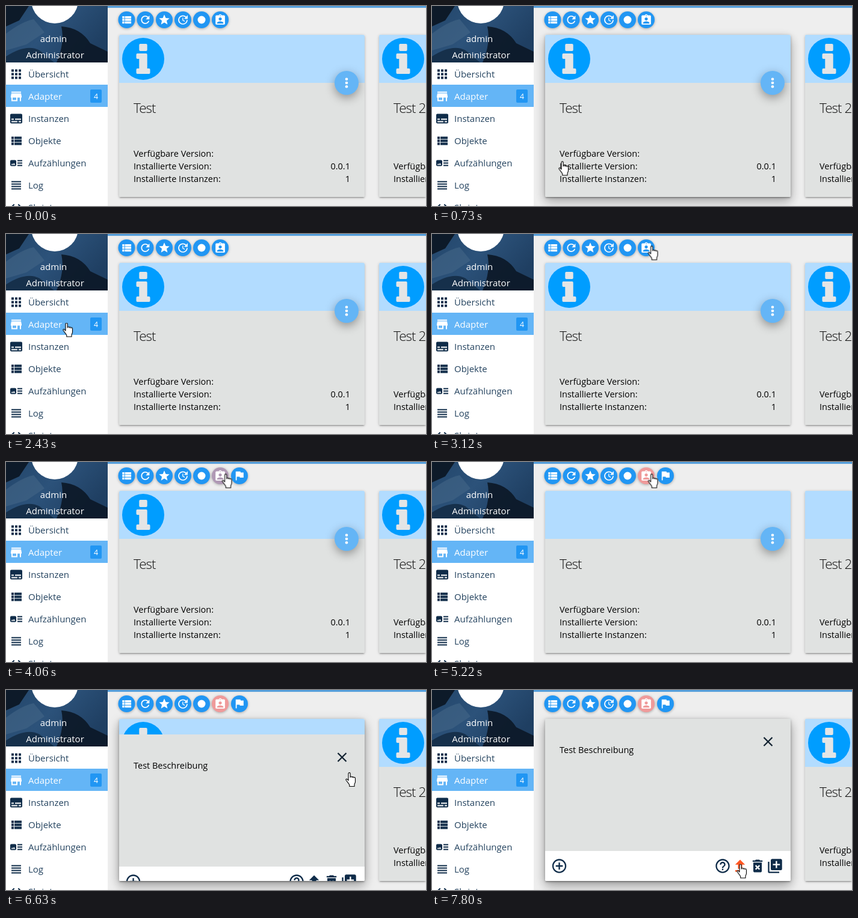
Recreate the animation shown at these times as an HTML page. Size 698 px wide and 333 px high, loop 8 s.

```html
<!DOCTYPE html>
<html lang="de">
<head>
<meta charset="utf-8">
<title>Adapter</title>
<style>
html, body { margin: 0; width: 100%; height: 100%; overflow: hidden; }
main { position: relative; width: 100%; height: 100%; overflow: hidden; contain: paint; background: #eee; }
svg, .card { position: absolute; }
svg { left: 0; top: 0; width: 698px; height: 333px; font-family: "Open Sans", "Noto Sans", sans-serif; font-size: 14.5px; }

.card { top: 48px; left: 188px; width: 408px; height: 270px; border-radius: 2px;
  box-shadow: 0 2px 2px rgba(0,0,0,.14), 0 3px 1px -2px rgba(0,0,0,.12), 0 1px 5px rgba(0,0,0,.2); }
.second { left: 620px; width: 78px; }
.lift { box-shadow: 0 8px 17px rgba(0,0,0,.2), 0 6px 20px rgba(0,0,0,.19); animation: lift 8s linear infinite; }

.nav { font-size: 15px; fill: #24435f; }
.icons { fill: #0f2c49; }
.white { fill: #fff; }
.strong { font-weight: 500; }
.mid { text-anchor: middle; }
.end { text-anchor: end; }
.title { font-size: 22.5px; font-weight: 300; letter-spacing: -1px; fill: #111; }
.round { fill: #2196f3; filter: drop-shadow(0 1px 2px rgba(0,0,0,.3)); }
.fab { fill: #64b5f6; filter: drop-shadow(0 5px 8px rgba(0,0,0,.36)); }
.tip rect { fill: #fff; stroke: #767676; filter: drop-shadow(2px 2px 2px rgba(0,0,0,.3)); }
.tip text { font-size: 11.5px; fill: #575757; }

/* With jump-start, each value below is what shows until its time. */
.hand, .reveal, .tip, .flag, .pic, .row { animation: 8s steps(1, start) infinite; }
.hand { animation-name: hand; }
.reveal { animation-name: reveal; }
.tip { animation-name: tip; }
.flag { animation-name: flag; }
.pic { animation-name: pic; }
.row { animation-name: row; }
.toggle { animation: toggle 8s linear infinite; }
.upload { animation: upload 8s linear infinite; }

@keyframes hand {
  0% { transform: translate(330px, 345px); }
  5.5% { transform: translate(330px, 345px); animation-timing-function: steps(6, start); }
  11.125% { transform: translate(150px, 215px); animation-timing-function: steps(4, start); }
  14.875% { transform: translate(102px, 166.5px); }
  15.875% { transform: translate(100.5px, 161px); }
  16.875% { transform: translate(96px, 154px); }
  18.75% { transform: translate(92px, 148px); }
  20.625% { transform: translate(85.5px, 135px); }
  30.375% { transform: translate(90.5px, 135px); }
  31.375% { transform: translate(94px, 147.5px); animation-timing-function: steps(4, start); }
  35.25% { transform: translate(230px, 85px); animation-timing-function: steps(4, start); }
  39% { transform: translate(352px, 25px); }
  71.125% { transform: translate(358.5px, 19.5px); animation-timing-function: steps(4, start); }
  75.125% { transform: translate(550px, 128px); }
  88.75% { transform: translate(564px, 137px); animation-timing-function: steps(4, start); }
  92.5% { transform: translate(540px, 200px); animation-timing-function: steps(5, start); }
  97.5% { transform: translate(508px, 284px); }
  100% { transform: translate(506px, 289.5px); }
}
@keyframes reveal {
  0%, 79.125% { transform: translateY(270px); }
  80% { transform: translateY(264px); }
  81% { transform: translateY(215px); }
  81.875% { transform: translateY(140px); }
  82.875% { transform: translateY(72px); }
  83.75% { transform: translateY(26px); }
  100% { transform: none; }
}
@keyframes tip { 0%, 42.875% { opacity: 0; } 47.875% { opacity: 1; } 100% { opacity: 0; } }
@keyframes flag { 0%, 48.875% { opacity: 0; } 100% { opacity: 1; } }
@keyframes pic { 0%, 65.25% { opacity: 1; } 66.375% { opacity: 0; } 100% { opacity: 1; } }
@keyframes row { 0%, 13% { opacity: 0; } 14.875% { opacity: .3; } 100% { opacity: 0; } }
@keyframes toggle { 0%, 48.5% { fill: #2196f3; } 51.75%, 100% { fill: #ef9a9a; } }
@keyframes upload { 0%, 95.5% { fill: #0f2c49; } 97.5%, 100% { fill: #ff5722; } }
@keyframes lift {
  0%, 6.5% { opacity: 0; }
  9.25% { opacity: .9; }
  12.125%, 34.25% { opacity: 0; }
  37.125% { opacity: .9; }
  39%, 71.25% { opacity: 0; }
  75.125%, 100% { opacity: 1; }
}
</style>
</head>
<body>
<main>
<div class="card"></div>
<div class="card lift"></div>
<div class="card second"></div>

<svg viewBox="0 0 698 333">
  <defs>
    <linearGradient id="night" x2="1" y2=".5">
      <stop stop-color="#23466a"/><stop offset=".5" stop-color="#2c527a"/><stop offset="1" stop-color="#1f3f62"/>
    </linearGradient>
    <clipPath id="photo"><path d="M0 0h169v94H0z"/></clipPath>
    <clipPath id="face"><rect x="188" y="48" width="408" height="270" rx="2"/></clipPath>

    <path id="apps" d="M4 8h4V4H4zm6 12h4v-4h-4zm-6 0h4v-4H4zm0-6h4v-4H4zm6 0h4v-4h-4zm6-10v4h4V4zm-6 4h4V4h-4zm6 6h4v-4h-4zm0 6h4v-4h-4z"/>
    <path id="store" d="M20 4H4v2h16V4zm1 10v-2l-1-5H4l-1 5v2h1v6h10v-6h4v6h2v-6h1zm-9 4H6v-4h6v4z"/>
    <path id="panel" d="M20 4H4c-1.1 0-2 .9-2 2v12c0 1.1.9 2 2 2h16c1.1 0 2-.9 2-2V6c0-1.1-.9-2-2-2zM4 12h4v2H4v-2zm10 6H4v-2h10v2zm6 0h-4v-2h4v2zm0-4H10v-2h10v2z"/>
    <path id="list" d="M4 14h4v-4H4v4zm0 5h4v-4H4v4zM4 9h4V5H4v4zm5 5h12v-4H9v4zm0 5h12v-4H9v4zM9 5v4h12V5H9z"/>
    <path id="track" d="M22 13h-8v-2h8v2zm0-6h-8v2h8V7zm-8 10h8v-2h-8v2zm-2-8v6c0 1.1-.9 2-2 2H4c-1.1 0-2-.9-2-2V9c0-1.1.9-2 2-2h6c1.1 0 2 .9 2 2zm-1.5 6l-2.25-3-1.75 2.26-1.25-1.51L3.5 15h7z"/>
    <path id="lines" d="M4 15h16v-2H4zm0 4h16v-2H4zm0-8h16V9H4zm0-6v2h16V5z"/>
    <path id="code" d="M9.4 16.6L4.8 12l4.6-4.6L8 6l-6 6 6 6zm5.2 0l4.6-4.6-4.6-4.6L16 6l6 6-6 6z"/>
    <path id="refresh" d="M17.65 6.35C16.2 4.9 14.21 4 12 4c-4.42 0-8 3.58-8 8s3.58 8 8 8c3.73 0 6.84-2.55 7.73-6h-2.08c-.82 2.33-3.04 4-5.65 4-3.31 0-6-2.69-6-6s2.69-6 6-6c1.66 0 3.14.69 4.22 1.78L13 11h7V4z"/>
    <path id="star" d="M12 17.27L18.18 21l-1.64-7.03L22 9.24l-7.19-.61L12 2 9.19 8.63 2 9.24l5.46 4.73L5.82 21z"/>
    <path id="update" d="M21 10.12h-6.78l2.74-2.82c-2.73-2.7-7.15-2.8-9.88-.1-2.73 2.71-2.73 7.08 0 9.79s7.15 2.71 9.88 0C18.32 15.65 19 14.08 19 12.1h2c0 1.98-.88 4.55-2.64 6.29-3.51 3.48-9.21 3.48-12.72 0-3.5-3.47-3.53-9.11-.02-12.58s9.14-3.47 12.65 0L21 3zM12.5 8v4.25l3.5 2.08-.72 1.21L11 13V8z"/>
    <path id="badge" d="M19 3h-4.18C14.4 1.84 13.3 1 12 1s-2.4.84-2.82 2H5c-1.1 0-2 .9-2 2v14c0 1.1.9 2 2 2h14c1.1 0 2-.9 2-2V5c0-1.1-.9-2-2-2zm-7 0c.55 0 1 .45 1 1s-.45 1-1 1-1-.45-1-1 .45-1 1-1zm0 4c1.66 0 3 1.34 3 3s-1.34 3-3 3-3-1.34-3-3 1.34-3 3-3zm6 12H6v-1.4c0-2 4-3.1 6-3.1s6 1.1 6 3.1z"/>
    <path id="pennant" d="M14.4 6L14 4H5v17h2v-7h5.6l.4 2h7V6z"/>
    <path id="add" d="M13 7h-2v4H7v2h4v4h2v-4h4v-2h-4zm-1-5C6.48 2 2 6.48 2 12s4.48 10 10 10 10-4.48 10-10S17.52 2 12 2zm0 18c-4.41 0-8-3.59-8-8s3.59-8 8-8 8 3.59 8 8-3.59 8-8 8z"/>
    <path id="help" d="M11 18h2v-2h-2zm1-16C6.48 2 2 6.48 2 12s4.48 10 10 10 10-4.48 10-10S17.52 2 12 2zm0 18c-4.41 0-8-3.59-8-8s3.59-8 8-8 8 3.59 8 8-3.59 8-8 8zm0-14c-2.21 0-4 1.79-4 4h2c0-1.1.9-2 2-2s2 .9 2 2c0 2-3 1.75-3 5h2c0-2.25 3-2.5 3-5 0-2.21-1.79-4-4-4z"/>
    <path id="upload" d="M9 16h6v-6h4l-7-7-7 7h4zm-4 2h14v2H5z"/>
    <path id="trash" d="M6 19c0 1.1.9 2 2 2h8c1.1 0 2-.9 2-2V7H6zm2.46-7.12l1.41-1.41L12 12.59l2.12-2.12 1.41 1.41L13.41 14l2.12 2.12-1.41 1.41L12 15.41l-2.12 2.12-1.41-1.41L10.59 14zM15.5 4l-1-1h-5l-1 1H5v2h14V4z"/>
    <path id="stack" d="M4 6H2v14c0 1.1.9 2 2 2h14v-2H4zm16-4H8c-1.1 0-2 .9-2 2v12c0 1.1.9 2 2 2h12c1.1 0 2-.9 2-2V4c0-1.1-.9-2-2-2zm-1 9h-4v4h-2v-4H9V9h4V5h2v4h4z"/>

    <g id="info">
      <circle r="35" fill="#009dff"/>
      <path transform="translate(0 1) scale(.96 1)" fill="#e3e5e6" d="M-5-26H5q2 0 2 2v8q0 2-2 2H-5q-2 0-2-2v-8q0-2 2-2zM-10-10H5q2 0 2 2V15h3q2 0 2 2v5q0 2-2 2h-20q-2 0-2-2v-5q0-2 2-2h3V-1h-3q-2 0-2-2v-5q0-2 2-2z"/>
    </g>
    <g id="front">
      <rect width="408" height="270" rx="2" fill="#e0e2e1"/>
      <path fill="#b2dcff" d="M0 80V2q0-2 2-2h404q2 0 2 2v78z"/>
    </g>
  </defs>

  <rect x="169" width="529" height="3" fill="#559fdc"/>
  <rect x="169" y="3" width="529" height="1" fill="#e2e5e8"/>

  <!-- toolbar -->
  <g class="round">
    <circle cx="200.5" cy="23" r="14"/><circle cx="231.5" cy="23" r="14"/><circle cx="263" cy="23" r="14"/>
    <circle cx="294" cy="23" r="14"/><circle cx="325" cy="23" r="14"/><circle class="toggle" cx="356" cy="23" r="14"/>
  </g>
  <g class="white">
    <use href="#list" transform="translate(189.8 12.6) scale(.87)"/>
    <use href="#refresh" transform="translate(221 12.6) scale(.87)"/>
    <use href="#star" transform="translate(252.6 12.4) scale(.87)"/>
    <use href="#update" transform="translate(283.6 12.6) scale(.87)"/>
    <circle cx="325" cy="23" r="6.5"/>
    <use href="#badge" transform="translate(345.6 12.8) scale(.87)"/>
  </g>
  <g class="flag">
    <circle class="round" cx="388" cy="23" r="14"/>
    <use class="white" href="#pennant" transform="translate(377.4 12.2) scale(.87)"/>
  </g>

  <!-- second card -->
  <use href="#front" transform="translate(620 48)"/>
  <use class="pic" href="#info" x="660" y="88"/>
  <text class="title" x="644" y="178">Test 2</text>
  <text x="644" y="272">Verfügbare Version:</text>
  <text x="644" y="293">Installierte Instanzen:</text>

  <!-- first card -->
  <g clip-path="url(#face)">
    <use href="#front" transform="translate(188 48)"/>
    <use class="pic" href="#info" x="228" y="88"/>
    <text class="title" x="212" y="178">Test</text>
    <text x="212" y="251">Verfügbare Version:</text>
    <text x="212" y="272">Installierte Version:</text>
    <text x="212" y="293">Installierte Instanzen:</text>
    <text class="end" x="572" y="272">0.0.1</text>
    <text class="end" x="572" y="293">1</text>
    <circle class="fab" cx="566" cy="128" r="20"/>
    <g class="white">
      <circle cx="566" cy="121.8" r="2.3"/><circle cx="566" cy="128" r="2.3"/><circle cx="566" cy="134.2" r="2.3"/>
    </g>
    <g class="reveal">
      <rect x="188" y="48" width="408" height="220" fill="#e0e2e1"/>
      <rect x="188" y="268" width="408" height="50" fill="#fff"/>
      <text x="212" y="105">Test Beschreibung</text>
      <path d="M551.5 79l14 14m0-14l-14 14" stroke="#10202f" stroke-width="2.2"/>
      <g class="icons">
        <use href="#add" transform="translate(197.5 279) scale(1.17)"/>
        <use href="#help" transform="translate(469 279) scale(1.17)"/>
        <use class="upload" href="#upload" transform="translate(498 279) scale(1.17)"/>
        <use href="#trash" transform="translate(527 279) scale(1.17)"/>
        <use href="#stack" transform="translate(556 279) scale(1.17)"/>
      </g>
    </g>
  </g>

  <!-- sidebar -->
  <rect width="169" height="333" fill="#fff"/>
  <g clip-path="url(#photo)">
    <rect width="169" height="94" fill="url(#night)"/>
    <path d="M0 0H38L22 24 0 34z" fill="#0d1a29"/>
    <path d="M0 46Q26 26 46 22L64 44 34 64 0 74z" fill="#446687" opacity=".6"/>
    <path d="M0 84Q34 62 56 74L80 94H0z" fill="#16304b"/>
    <path d="M92 34Q124 36 140 62L169 76V94H84Q98 62 92 34z" fill="#0c1826" opacity=".9"/>
    <circle cx="81" cy="-10" r="39" class="white"/>
  </g>
  <rect y="131" width="169" height="37" fill="#64b5f6"/>
  <rect x="140" y="139" width="19" height="22" rx="2" fill="#2196f3"/>
  <g class="icons">
    <use href="#apps" x="5" y="101.5"/>
    <use class="white" href="#store" x="5" y="138.5"/>
    <use href="#panel" x="5" y="175.5"/>
    <use href="#list" x="5" y="212.5"/>
    <use href="#track" x="5" y="249.5"/>
    <use href="#lines" x="5" y="286.5"/>
    <use href="#code" x="5" y="323.5"/>
  </g>
  <g class="nav">
    <g class="white strong">
      <text class="mid" x="79" y="60">admin</text>
      <text class="mid" x="81.5" y="87">Administrator</text>
      <text x="37" y="156">Adapter</text>
      <text class="mid" x="149.5" y="155" font-size="12.5">4</text>
    </g>
    <text x="37" y="119">Übersicht</text>
    <text x="37" y="193">Instanzen</text>
    <text x="37" y="230">Objekte</text>
    <text x="37" y="267">Aufzählungen</text>
    <text x="37" y="304">Log</text>
    <text x="37" y="341">Skripte</text>
  </g>
  <rect class="row" y="176" width="169" height="21" fill="#9bcdf8"/>

  <g class="tip">
    <rect x="374.5" y="35.5" width="94" height="20"/>
    <text x="379" y="50">Expertenmodus</text>
  </g>
  <path class="hand" fill="#fff" stroke="#000" stroke-width="1.1" stroke-linejoin="round"
    d="M5 13.5V2.2a1.6 1.6 0 0 1 3.2 0V8.4c0-1.9 3-1.7 3 .2 0-1.5 2.8-1.3 2.8.5 0-1.3 2.5-1.1 2.5.8V16c0 2-1.5 3-1.5 4.5v3H6.8v-2.3C6 19 3 16 1.2 13.3.2 11.6 2 10.5 3.2 11.6z"/>
</svg>
</main>
</body>
</html>
```
